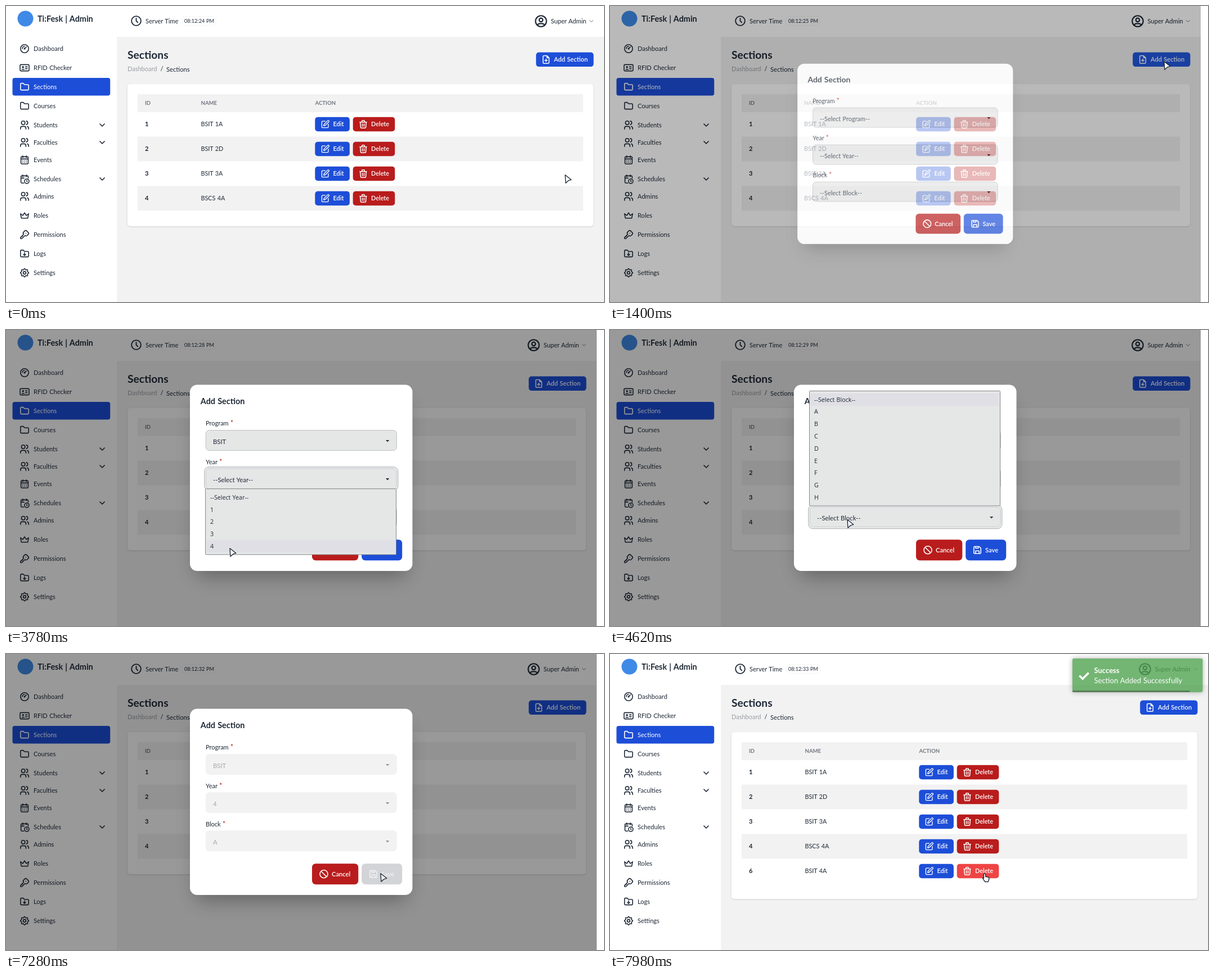
An HTML page for the animation above (8 s loop, 1063x527 px).

```html
<!DOCTYPE html>
<html lang="en">
<head>
<meta charset="utf-8">
<title>Sections</title>
<style>
html, body { margin: 0; width: 100%; height: 100%; overflow: hidden; background: #fff; }
svg { display: block; width: 1063px; height: 527px; font-family: Lato, Inter, sans-serif; }
text { word-spacing: .05em; }
.list { font-family: "Open Sans", "Noto Sans", sans-serif; }
.card { filter: drop-shadow(0 1px 1.5px rgba(0, 0, 0, .13)); }
.toast { filter: drop-shadow(0 0 4.8px #999); }
.deep { filter: blur(17px); }
</style>
</head>
<body>
<svg id="stage" viewBox="0 0 1063 527"></svg>
<script>
const LOOP = 8000, TICK = 70;
const INK = '#1f2937', PALE = '#f2f2f2', FIELD = '#e5e6e6';
const BLUE = [29, 78, 216], BLUE_HOVER = [59, 130, 246];
const RED = [185, 28, 28], RED_HOVER = [239, 68, 68], OFF = [210, 212, 215];
const stage = document.getElementById('stage');

// Motion helpers
const clamp = v => Math.max(0, Math.min(1, v));
const ramp = (t, start, length) => clamp((t - start) / length);
const ease = p => p * p * (3 - 2 * p);
const mix = (a, b, p) => `rgb(${a.map((v, i) => Math.round(v + (b[i] - v) * p))})`;
const latest = (keys, t) => keys.filter(k => k[0] <= t).pop()[1];
const within = (t, [a, b]) => t >= a && t < b;

// cubic-bezier(0, 0, .2, 1)
function easeOut(x) {
  let lo = 0, hi = 1;
  for (let i = 0; i < 20; i++) {
    const s = (lo + hi) / 2;
    if (.6 * s * s + .4 * s * s * s < x) lo = s; else hi = s;
  }
  return lo * lo * (3 - 2 * lo);
}

const PATH = [
  [210, 993, 300], [630, 985, 115], [700, 985, 115], [1120, 984, 98], [1470, 984, 98],
  [1890, 562, 200], [2240, 562, 200], [2590, 438, 246], [2940, 438, 246],
  [3150, 425, 268], [3290, 425, 268], [3780, 397, 388], [4060, 397, 388],
  [4480, 421, 337], [4830, 421, 337], [5180, 372, 121], [5390, 361, 156],
  [5670, 361, 156], [5740, 366, 152], [5810, 366, 152], [5880, 370, 149],
  [6230, 370, 149], [7070, 665, 390]
];
function pointer(t) {
  const i = PATH.findIndex(k => k[0] > t);
  if (i < 0) return PATH[PATH.length - 1].slice(1);
  if (i === 0) return PATH[0].slice(1);
  const [a, b] = [PATH[i - 1], PATH[i]];
  const p = ease(ramp(t, a[0], b[0] - a[0]));
  return [a[1] + (b[1] - a[1]) * p, a[2] + (b[2] - a[2]) * p];
}

const SECONDS = [[0, 24], [420, 25], [1470, 26], [2450, 27], [3430, 28], [4410, 29],
  [5530, 31], [6510, 32], [7560, 33]];

// Drawing helpers
const rect = (x, y, w, h, fill, rx = 0, more = '') =>
  `<rect x="${x}" y="${y}" width="${w}" height="${h}" rx="${rx}" fill="${fill}" ${more}/>`;
const text = (x, y, s, size = 11.1, fill = INK, weight = 400, more = '') =>
  `<text x="${x}" y="${y + size * .36}" font-size="${size}" fill="${fill}" font-weight="${weight}" ${more}>${s}</text>`;
const ring = (x, y, r) => `M${x - r} ${y}a${r} ${r} 0 1 0 ${2 * r} 0a${r} ${r} 0 1 0 ${-2 * r} 0`;
const icon = (name, x, y, scale = .8, color = INK, width = 2) =>
  `<path transform="translate(${x - 12 * scale} ${y - 12 * scale}) scale(${scale})" d="${ICONS[name]}"
    fill="none" stroke="${color}" stroke-width="${width}" stroke-linecap="round" stroke-linejoin="round"/>`;
const rgb = c => `rgb(${c})`;

function gear() {
  let d = '';
  for (let i = 0; i < 96; i++) {
    const a = i * Math.PI / 48, r = 8.1 + 1.1 * Math.cos(8 * a);
    d += (i ? 'L' : 'M') + (12 + r * Math.sin(a)).toFixed(2) + ' ' + (12 - r * Math.cos(a)).toFixed(2);
  }
  return d + 'z' + ring(12, 12, 3);
}

const FOLDER = 'M5 4h4l3 3h7a2 2 0 0 1 2 2v8a2 2 0 0 1-2 2h-14a2 2 0 0 1-2-2v-11a2 2 0 0 1 2-2';
const ICONS = {
  gauge: ring(12, 12, 9) + ring(12, 12, 1) + 'M13.4 10.6l2.6-2.6M7 12a5 5 0 0 1 5-5',
  card: 'M4 5h16a2 2 0 0 1 2 2v10a2 2 0 0 1-2 2h-16a2 2 0 0 1-2-2v-10a2 2 0 0 1 2-2M14 10h4M14 14h4M6 15.5h5' + ring(8.5, 10.5, 1.3),
  folder: FOLDER,
  down: FOLDER + 'M12 10v6M9.5 13.5l2.5 2.5l2.5-2.5',
  users: ring(9, 7, 4) + 'M3 21v-2a4 4 0 0 1 4-4h4a4 4 0 0 1 4 4v2M16 3.1a4 4 0 0 1 0 7.8M21 21v-2a4 4 0 0 0-3-3.9',
  calendar: 'M6 5h12a2 2 0 0 1 2 2v12a2 2 0 0 1-2 2h-12a2 2 0 0 1-2-2v-12a2 2 0 0 1 2-2M16 3v4M8 3v4M4 10h16M8 14h0M12 14h0M16 14h0M8 17.5h0M12 17.5h0M16 17.5h0',
  schedule: 'M10.5 21h-4.5a2 2 0 0 1-2-2v-12a2 2 0 0 1 2-2h12a2 2 0 0 1 2 2v3M16 3v4M8 3v4M4 10h7M17 15v2l1 1' + ring(17, 17, 5),
  crown: 'M12 6l4 6l5-4l-2 10h-14l-2-10l5 4z',
  key: 'M16.6 3.8l3.6 3.6a2.9 2.9 0 0 1 0 4.1l-2.7 2.7a2.9 2.9 0 0 1-4 0l-.4-.3l-6.5 6.5a2 2 0 0 1-1.4.6h-1.2a1 1 0 0 1-1-1v-1.2a2 2 0 0 1 .6-1.4l.4-.4h2v-2h2v-2l2.1-2.1l-.3-.3a2.9 2.9 0 0 1 0-4.1l2.7-2.7a2.9 2.9 0 0 1 4.1 0zM15 9h0',
  gear: gear(),
  clock: ring(12, 12, 9) + 'M12 7v5l3 3',
  user: ring(12, 12, 9) + ring(12, 10, 3) + 'M6.2 18.8a4 4 0 0 1 3.8-2.8h4a4 4 0 0 1 3.8 2.8',
  edit: 'M12 4h-7a2 2 0 0 0-2 2v13a2 2 0 0 0 2 2h13a2 2 0 0 0 2-2v-7M18.4 2.6a2.1 2.1 0 0 1 3 3l-9.4 9.4l-4 1l1-4z',
  trash: 'M4 7h16M10 11v6M14 11v6M5 7l1 12a2 2 0 0 0 2 2h8a2 2 0 0 0 2-2l1-12M9 7v-3a1 1 0 0 1 1-1h4a1 1 0 0 1 1 1v3',
  file: 'M14 3v4a1 1 0 0 0 1 1h4M17 21h-10a2 2 0 0 1-2-2v-14a2 2 0 0 1 2-2h7l5 5v11a2 2 0 0 1-2 2zM12 11v6M9 14h6',
  ban: ring(12, 12, 9) + 'M5.7 5.7l12.6 12.6',
  save: 'M6 4h10l4 4v10a2 2 0 0 1-2 2h-12a2 2 0 0 1-2-2v-12a2 2 0 0 1 2-2M8 4v4h6v-4M8 20v-6h8v6',
  chevron: 'M6 9l6 6l6-6'
};

const MENU = [
  ['gauge', 'Dashboard', 76], ['card', 'RFID Checker', 110], ['folder', 'Sections', 144],
  ['folder', 'Courses', 178], ['users', 'Students', 212, 1], ['users', 'Faculties', 243, 1],
  ['calendar', 'Events', 274], ['schedule', 'Schedules', 308, 1], ['users', 'Admins', 339],
  ['crown', 'Roles', 373], ['key', 'Permissions', 407], ['down', 'Logs', 441], ['gear', 'Settings', 475]
];
const ROWS = [[1, 'BSIT 1A'], [2, 'BSIT 2D'], [3, 'BSIT 3A'], [4, 'BSCS 4A'], [6, 'BSIT 4A']];

function sidebar() {
  let s = rect(0, 0, 197, 527, '#fff') + '<circle cx="34.5" cy="22.5" r="14" fill="#3f8ae6"/>';
  s += text(56, 23, 'Ti:Fesk | Admin', 14.4, INK, 700);
  for (const [name, label, y, opens] of MENU) {
    const on = label === 'Sections', color = on ? '#fff' : INK;
    if (on) s += rect(11.5, 128, 173.7, 31.5, rgb(BLUE), 4);
    s += icon(name, 33, y, .8, color) + text(49, y, label, 11.1, color);
    if (opens) s += icon('chevron', 171, y, .67, INK, 2.5);
  }
  return s;
}

function topbar(t, inset) {
  const time = `08:12:${latest(SECONDS, t)} PM`;
  return rect(197, 0, 866, 55, '#fff') + icon('clock', 231.5, 26.5, .93)
    + text(248, 27, 'Server Time')
    + rect(312, 18.5, 62, 16, '#fff', 7.5, `stroke="${PALE}" stroke-width=".8"`)
    + text(317, 27, time, 9.1)
    + `<g transform="translate(${-inset} 0)">` + icon('user', 951, 27, 1.08)
    + text(968.5, 27, 'Super Admin', 11.2) + icon('chevron', 1040.5, 27, .5, '#6b7280', 2) + '</g>';
}

function table(t, inset) {
  const rows = t >= 7630 ? ROWS : ROWS.slice(0, 4);
  const nameX = 346.5 - inset * .12, actX = 549.5 - inset * .4;
  const hover = ease(ramp(t, 840, 150)) * (1 - ease(ramp(t, 1330, 100)));
  const head = (x, s) => text(x, 172.5, s, 9.6, '#717680', 700);
  let s = text(216, 87, 'Sections', 19.2, INK, 700)
    + text(216, 112.5, 'Dashboard', 11, '#9a9da3') + text(274.5, 112.5, '/', 11) + text(285, 112.5, 'Sections', 11.2)
    + `<g transform="translate(${-inset} 0)">` + rect(942.2, 82.5, 102.3, 25.6, mix(BLUE, BLUE_HOVER, hover), 5)
    + icon('file', 960, 95.3, .76, '#fff') + text(974, 95.5, 'Add Section', 11.1, '#fff', 600) + '</g>'
    + rect(216, 139, 828 - inset, 77 + rows.length * 44, '#fff', 4.8, 'class="card"')
    + rect(234, 157, 792 - inset, 32, PALE)
    + head(247, 'ID') + head(nameX, 'NAME') + head(actX, 'ACTION');
  rows.forEach(([id, name], i) => {
    const y = 210.5 + i * 44;
    const hot = id === 6 ? ease(ramp(t, 7660, 150)) : 0;
    if (i % 2) s += rect(234, y - 22, 792 - inset, 44, PALE);
    s += text(247, y, id, 11.1, INK, 700) + text(nameX, y, name, 10.8)
      + `<g transform="translate(${actX} ${y})">`
      + rect(-.2, -12.8, 61.6, 25.6, rgb(BLUE), 5) + icon('edit', 18, 0, .68, '#fff') + text(32, 0, 'Edit', 11, '#fff', 600)
      + rect(67.2, -12.8, 74.6, 25.6, mix(RED, RED_HOVER, hot), 5) + icon('trash', 85.5, 0, .76, '#fff') + text(99.5, 0, 'Delete', 10.9, '#fff', 600)
      + '</g>';
  });
  return s;
}

// Form fields: label, centre, shown values, focus span, list span, list top, options
const FIELDS = [
  { label: 'Program', y: 196.5, shown: [[0, '--Select Program--'], [2870, 'BSIT']], focus: [2100, 3220],
    open: [2100, 2870], top: 214.5, items: ['--Select Program--', 'BSIT', 'BSCS', 'BLIS', 'BSIS'] },
  { label: 'Year', y: 264.7, shown: [[0, '--Select Year--'], [4130, '4']], focus: [3220, 4620],
    open: [3220, 4130], top: 282.7, items: ['--Select Year--', 1, 2, 3, 4] },
  { label: 'Block', y: 332.8, shown: [[0, '--Select Block--'], [6020, 'A']], focus: [4620, 7070],
    open: [4620, 6020], top: 108.5, items: ['--Select Block--', ...'ABCDEFGH'] }
];

function field(f, t, off) {
  const { y } = f, focus = within(t, f.focus);
  let s = text(355, y - 30, `${f.label}<tspan dx="3" fill="#b91c1c" font-size="13">*</tspan>`, 11);
  if (focus) s += rect(352.8, y - 20.7, 343.9, 41.4, 'none', 8, 'stroke="#b4b7bb" stroke-width="1.3"');
  s += rect(355.2, y - 18, 339.2, 36, off ? PALE : FIELD, 6, `stroke="${off ? PALE : '#b9bcc0'}" stroke-width=".9"`);
  s += text(368, y + 2.3, latest(f.shown, t), 11.3, off ? '#a5a9af' : INK);
  return s + `<path d="M675 ${y - .6}h6.4l-3.2 3.3z" fill="${off ? '#8b9098' : INK}"/>`;
}

function dropdown(f, py) {
  const step = 21.8, first = f.top + 4.4;
  let hot = Math.floor((py + 3 - first) / step);
  if (!(hot >= 0 && hot < f.items.length)) hot = 0;
  let s = rect(354.5, f.top, 339, f.items.length * step + 8.2, FIELD, 1, 'stroke="#858789"')
    + rect(356, first + hot * step, 335, step, '#dfdfe5');
  f.items.forEach((item, i) => {
    s += text(363, first + (i + .5) * step, item, 10.7, INK, 400, 'class="list"');
  });
  return s;
}

// Backdrop and box fade as one layer, so the box shows the undimmed page through it
function modal(t, py) {
  const p = t < 7490 ? easeOut(ramp(t, 1333, 200)) : 1 - easeOut(ramp(t, 7490, 200));
  if (p <= 0) return '';
  const off = t >= 7140, fade = ramp(t, 7070, 140);
  const hover = ease(ramp(t, 6900, 150));
  const saveFill = off ? mix(BLUE_HOVER, OFF, fade) : mix(BLUE, BLUE_HOVER, hover);
  const saveInk = mix([255, 255, 255], [240, 241, 242], off ? fade : 0);
  const scale = .9 + .1 * p;
  let s = `<g opacity="${p}">`;
  if (t < 7490) s += rect(0, 0, 1050, 527, '#000', 0, 'opacity=".4"');
  s += `<g transform="translate(524.75 263.25) scale(${scale}) translate(-524.75 -263.25)">`
    + rect(337, 127, 375.5, 312, '#000', 12, 'opacity=".3" class="deep"')
    + rect(327, 97.5, 395.5, 331.5, '#fff', 12.8)
    + text(345.8, 127, 'Add Section', 14.4, INK, 700);
  for (const f of FIELDS) s += field(f, t, off);
  s += rect(544, 373.2, 82.3, 37, rgb(RED), 6.4) + icon('ban', 565, 391.7, .78, '#fff')
    + text(579, 391.8, 'Cancel', 11.2, '#fff', 600)
    + rect(632.2, 373.2, 72, 37, saveFill, 6.4) + icon('save', 653, 391.7, .78, saveInk)
    + text(667, 391.8, 'Save', 11.2, saveInk, 600);
  for (const f of FIELDS) if (within(t, f.open)) s += dropdown(f, py);
  return s + '</g></g>';
}

function toast(t) {
  if (t < 7490) return '';
  const shown = .5 - .5 * Math.cos(Math.PI * ramp(t, 7490, 300));
  const left = 1 - ramp(t, 7480, 5000);
  return `<g opacity="${.8 * shown}" class="toast">` + rect(822, 8, 231.5, 60, '#51a351', 2.4)
    + '<path d="M834.5 38.5l5.7 5.7l10.6-10.8" fill="none" stroke="#fff" stroke-width="3.6"/>'
    + text(860.5, 29.5, 'Success', 13, '#fff', 700)
    + text(860.5, 47.7, 'Section Added Successfully', 13, '#fff')
    + rect(822, 65, 231.5 * left, 3, '#000', 0, 'opacity=".4"') + '</g>';
}

const HAND = 'M4 .8c1 0 1.6.7 1.6 1.6v4.1c3 .3 6.2.5 6.2 2.8c0 3.5-1.4 4.5-1.6 6.2h-5.6c-.6-2-3.4-4-4-5.9c-.2-1 1-1.3 1.8-.3v-6.9c0-.9.6-1.6 1.6-1.6z';
const ARROW = 'M1 .8L11.7 9.3L6.6 10.9L2 15.3z';
const HAND_SPANS = [[910, 1330], [1890, 2100], [3150, 3220], [4480, 4620], [6930, 7140], [7630, LOOP]];

function cursor(t, x, y) {
  const hand = HAND_SPANS.some(span => within(t, span));
  return `<path transform="translate(${hand ? x - 3 : x} ${y})" d="${hand ? HAND : ARROW}"
    fill="#fff" stroke="${INK}" stroke-width="1.4" stroke-linejoin="round"/>`;
}

function draw(t) {
  const [x, y] = pointer(t);
  const inset = within(t, [1330, 7490]) ? 13 : 0;
  stage.innerHTML = rect(0, 0, 1063, 527, PALE) + topbar(t, inset) + sidebar() + table(t, inset)
    + modal(t, y) + (inset ? rect(1050, 0, 13, 527, '#fff') : '') + toast(t) + cursor(t, x, y);
}

const start = performance.now();
let last = -1;
function frame() {
  const t = Math.floor(((performance.now() - start) % LOOP) / TICK) * TICK;
  if (t !== last) draw(last = t);
  requestAnimationFrame(frame);
}
frame();
</script>
</body>
</html>
```
